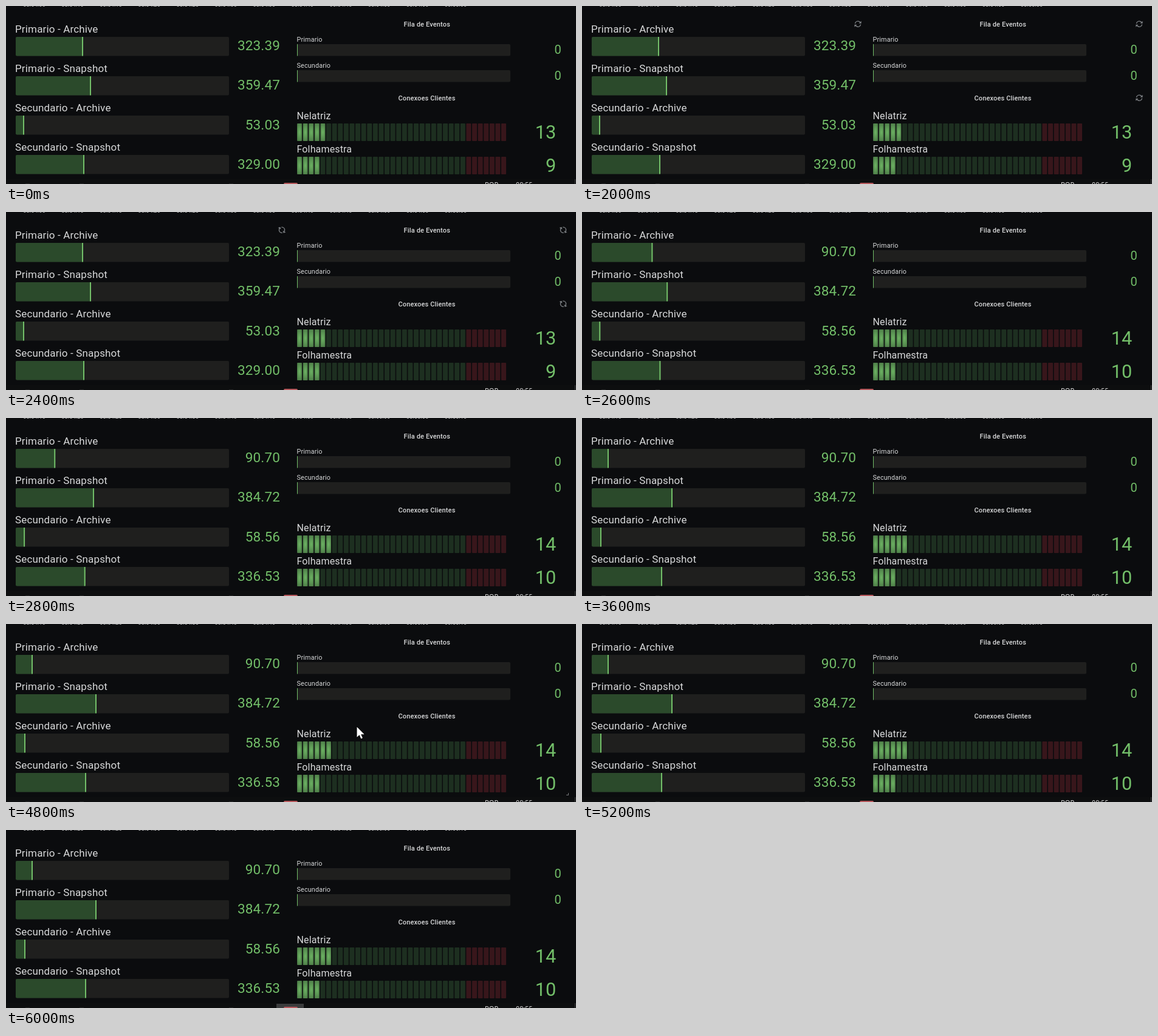
An HTML page with a canvas for the animation above (6200 ms loop, 938 by 294 pixels).

```html
<!DOCTYPE html>
<html lang="pt">
<head>
<meta charset="utf-8">
<style>
  html, body { margin: 0; width: 938px; height: 294px; overflow: hidden; background: #0b0c0e; }
  canvas { display: block; }
</style>
</head>
<body>
<canvas id="stage" width="938" height="294"></canvas>
<script>
const ctx = document.getElementById('stage').getContext('2d');
const LOOP = 6200, TICK = 200;
const GREEN = '#73bf69', TRACK = '#1f1f1e', LABEL = '#d8d9da';

// label, old and new value, old and new right end of the fill
const gauges = [
  ['Primario - Archive', '323.39', '90.70', 127, 44],
  ['Primario - Snapshot', '359.47', '384.72', 140, 149],
  ['Secundario - Archive', '53.03', '58.56', 30, 32],
  ['Secundario - Snapshot', '329.00', '336.53', 129, 132]
];
// label, top, old and new count, old and new lit cells
const meters = [
  ['Nelatriz', 194, 13, 14, 5, 6],
  ['Folhamestra', 249, 9, 10, 4, 4]
];

function text(str, x, y, size, color = LABEL, align = 'left', weight = 400, family = 'Roboto') {
  ctx.font = `${weight} ${size}px ${family}, sans-serif`;
  ctx.letterSpacing = '0.15px';
  ctx.fillStyle = color;
  ctx.textAlign = align;
  ctx.fillText(str, x, y);
}

function box(x, y, w, h, color, r = 0) {
  ctx.fillStyle = color;
  ctx.beginPath();
  ctx.roundRect(x, y, w, h, r);
  ctx.fill();
}

// CSS "ease": cubic-bezier(.25, .1, .25, 1)
function ease(x) {
  if (x <= 0) return 0;
  if (x >= 1) return 1;
  const curve = (s, a, b) => 3 * s * (1 - s) ** 2 * a + 3 * s * s * (1 - s) * b + s ** 3;
  let lo = 0, hi = 1;
  for (let i = 0; i < 24; i++) {
    const mid = (lo + hi) / 2;
    if (curve(mid, .25, .25) < x) lo = mid; else hi = mid;
  }
  return curve(lo, .1, 1);
}

function drawAxis(first) {
  for (let i = 0; i < 12; i++) {
    const s = first + i * 5, pad = n => String(n).padStart(2, '0');
    text(`08:${pad(54 + Math.floor(s / 60))}:${pad(s % 60)}`, 46.5 + i * 63.05, 1.4, 9.2, LABEL, 'center');
  }
}

function drawGauge([label, before, after, from, to], i, fresh, k) {
  const y = 51 + 65 * i, h = 31.5, end = from + (to - from) * k;
  text(label, 15, y - 7, 17);
  box(16, y, 351, h, TRACK, 2);
  box(16, y, end - 16, h, '#2b4a2b', 2);
  box(end - 2, y, 2, h, GREEN);
  text(fresh ? after : before, 451, Math.round(73 + 65.3 * i), 22.5, GREEN, 'right');
}

function drawQueue(label, y) {
  text(label, 478.5, y - 4, 10.8);
  box(479, y, 351, 19.5, TRACK, 2);
  box(479, y, 1, 19.5, GREEN);
  text('0', 914, y + 16, 20, GREEN, 'right');
}

// Elliptical glow reaching the corners of a lit cell
function drawLitCell(x, y, w, h) {
  const glow = ctx.createRadialGradient(0, 0, 0, 0, 0, Math.SQRT2);
  glow.addColorStop(0, '#6eb664');
  glow.addColorStop(1, '#446e40');
  ctx.save();
  ctx.translate(x + w / 2, y + h / 2);
  ctx.scale(w / 2, h / 2);
  box(-1, -1, 2, 2, glow, .12);
  ctx.restore();
}

function drawMeter([label, y, before, after, litBefore, litAfter], fresh) {
  const lit = fresh ? litAfter : litBefore;
  text(label, 478.5, y - 7, 16);
  for (let i = 0; i < 36; i++) {
    const x = 479 + i * 9.6;
    if (i < lit) drawLitCell(x, y, 8, 29);
    else box(x, y, 8, 29, i < 29 ? '#1d2f20' : '#38161b', 1);
  }
  text(fresh ? after : before, 905.5, y + 25, 30.7, GREEN, 'right');
}

function drawSpinner(x, y, angle) {
  ctx.save();
  ctx.translate(x, y);
  ctx.rotate(angle);
  ctx.strokeStyle = ctx.fillStyle = '#7d8084';
  ctx.lineWidth = 1.4;
  for (let i = 0; i < 2; i++) {
    ctx.beginPath();
    ctx.arc(0, 0, 4.6, -Math.PI + .15, -.5);
    ctx.stroke();
    ctx.fill(new Path2D('M5.6 -5V-1H1.6Z'));
    ctx.rotate(Math.PI);
  }
  ctx.restore();
}

function drawTaskbar(hover) {
  box(0, 286, 938, 8, '#0d0e0f');
  if (hover) box(445, 287, 45, 7, '#3b3c3d');
  box(457, 292, 23, 4, '#b5575b', 2);
  for (const x of [32, 121, 367]) box(x, 293, 7, 1, '#252627');
  box(936, 286, 1, 8, '#3c3d3e');
  text('POR', 788, 298.8, 11, '#eee', 'left', 400, '"Open Sans"');
  text('08:55', 839, 298.8, 10.5, '#eee', 'left', 400, '"Open Sans"');
}

function drawCursor(x, y) {
  const arrow = new Path2D('M0 0V17L4 13.3L6.8 19.4L9.4 18.2L6.6 12.3H12.2Z');
  ctx.save();
  ctx.translate(x, y);
  ctx.lineWidth = 1.5;
  ctx.strokeStyle = '#000';
  ctx.stroke(arrow);
  ctx.fillStyle = '#fff';
  ctx.fill(arrow);
  ctx.restore();
}

function draw(now) {
  const t = Math.floor(now % LOOP / TICK) * TICK;
  const fresh = t >= 2600, k = ease((t - 2480) / 1000);

  box(0, 0, 938, 294, '#0b0c0e');
  drawAxis(t < 2800 ? 5 : 15);
  gauges.forEach((g, i) => drawGauge(g, i, fresh, k));

  text('Fila de Eventos', 692.8, 34, 11, LABEL, 'center', 500);
  drawQueue('Primario', 63);
  drawQueue('Secundario', 106);
  text('Conexoes Clientes', 692.5, 156, 11, LABEL, 'center', 500);
  meters.forEach(m => drawMeter(m, fresh));

  if (t >= 2000 && !fresh) {
    const angle = (t - 2000) / 1000 * Math.PI;
    for (const [x, y] of [[454, 29.7], [917, 29.7], [917, 151.7]]) drawSpinner(x, y, angle);
  }
  drawTaskbar(t >= 6000);
  if (t >= 4800 && t < 5200) {
    box(922, 282, 4, 1, '#77797b');
    box(925, 279, 1, 4, '#77797b');
  }
  if (t === 4800) drawCursor(577.5, 170);
}

const start = performance.now();
(function frame() {
  draw(performance.now() - start);
  requestAnimationFrame(frame);
})();
</script>
</body>
</html>
```
